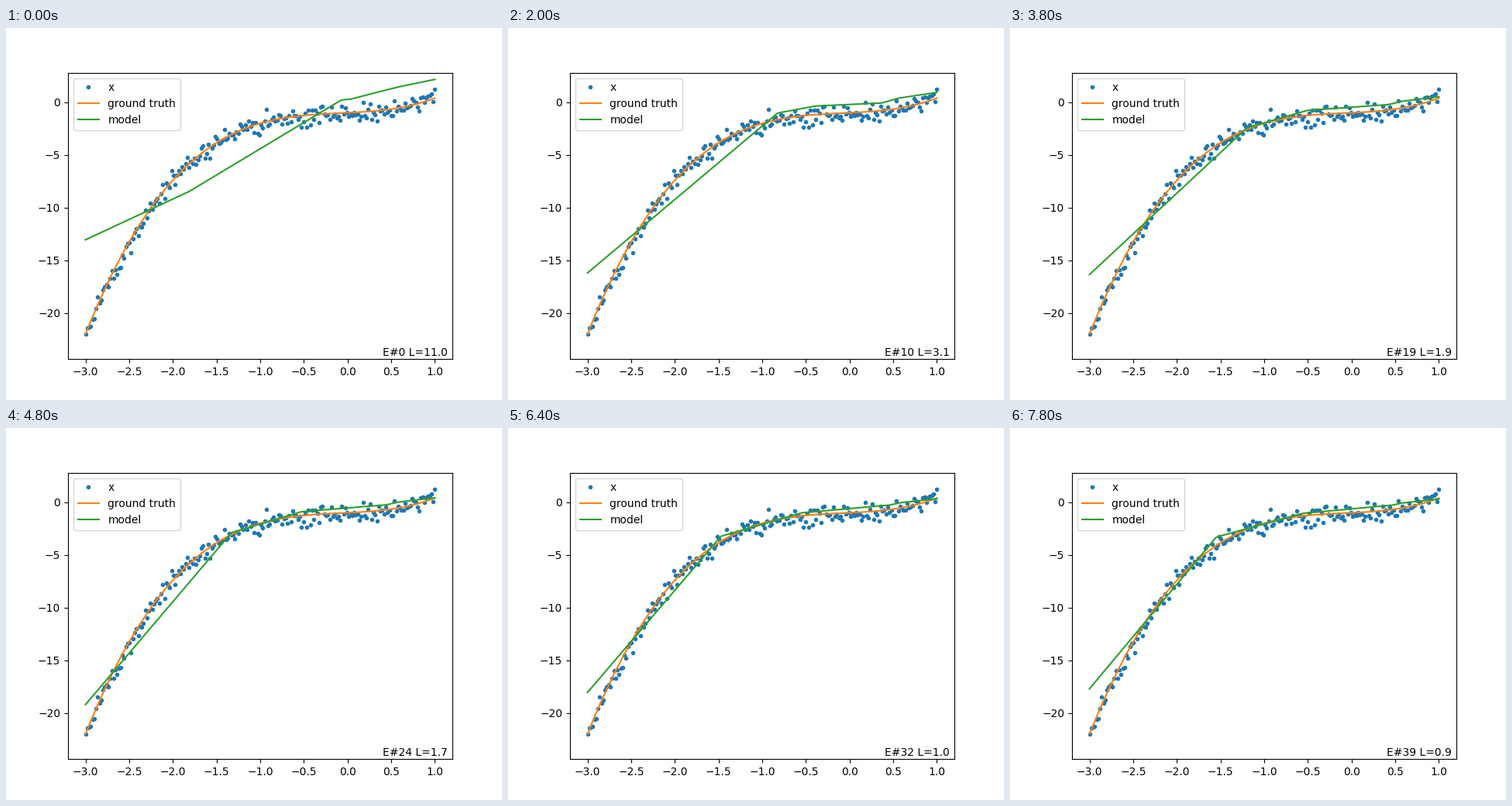
A matplotlib script that plays this animation: 640 by 480 pixels, repeating every 10 s.

```python
import numpy as np
import matplotlib.pyplot as plt
from matplotlib.animation import FuncAnimation

EPOCHS, FRAMES, INTERVAL = 40, 50, 200

# Left end of the fit and the loss wander, so both follow a few key epochs.
KEYS = [0, 6, 10, 19, 24, 32, 39]
LEFT = [-13.05, -15.1, -16.2, -16.35, -19.2, -18.05, -17.7]
LOSS = [11.0, 4.4, 3.1, 1.9, 1.7, 1.0, 0.9]


def truth(x):
    return 0.8 * x**3 + 0.2 * x**2 + 0.4 * x - 1


def blend(values, epoch):
    """Interpolate between key epochs, faster in early ones."""
    return np.interp(np.log1p(epoch), np.log1p(KEYS), values)


def settle(start, change, epoch, tau, power=1):
    """Move from start by change, levelling off with time constant tau."""
    return start + change * (1 - np.exp(-(epoch / tau) ** power))


def model(x, epoch):
    """Piecewise linear fit whose knots settle as training goes on."""
    knots = [
        (-3, blend(LEFT, epoch)),
        (settle(-0.07, -1.62, epoch, 16), settle(0.22, -3.55, epoch, 16, 1.8)),
        (settle(0.04, -0.60, epoch, 8), settle(0.30, -1.38, epoch, 14, 1.3)),
        (settle(0.24, 0.26, epoch, 15), settle(0.74, -1.0, epoch, 6)),
        (0.57, settle(1.43, -1.53, epoch, 9)),
        (1, settle(2.17, -1.9, epoch, 9.5)),
    ]
    kx, ky = zip(*knots)
    # An extra bend in the long left segment straightens out early.
    sag = -0.79 * max(0, 1 - epoch / 6)
    return np.interp(x, kx, ky) + np.interp(x, [-3, -1.81, kx[1]], [0, sag, 0])


def loss(epoch):
    return np.exp(blend(np.log(LOSS), epoch))


rng = np.random.default_rng(7)
x = np.linspace(-3, 1, 200)
y = truth(x) + rng.normal(0, 0.53, x.size)

fig, ax = plt.subplots(figsize=(6.4, 4.8), dpi=100)
ax.plot(x, y, ".", label="x")
ax.plot(x, truth(x), label="ground truth")
fit, = ax.plot(x, model(x, 0), label="model")
note = ax.text(0.4, -24.06, "")
ax.set_xlim(-3.2, 1.2)
ax.set_ylim(-24.37, 2.81)
ax.legend(loc="upper left")


def update(frame):
    epoch = min(frame, EPOCHS - 1)
    fit.set_ydata(model(x, epoch))
    note.set_text(f"E#{epoch} L={loss(epoch):.1f}")
    return fit, note


anim = FuncAnimation(fig, update, frames=FRAMES, interval=INTERVAL,
                     repeat=True, repeat_delay=0)
plt.show()
```
